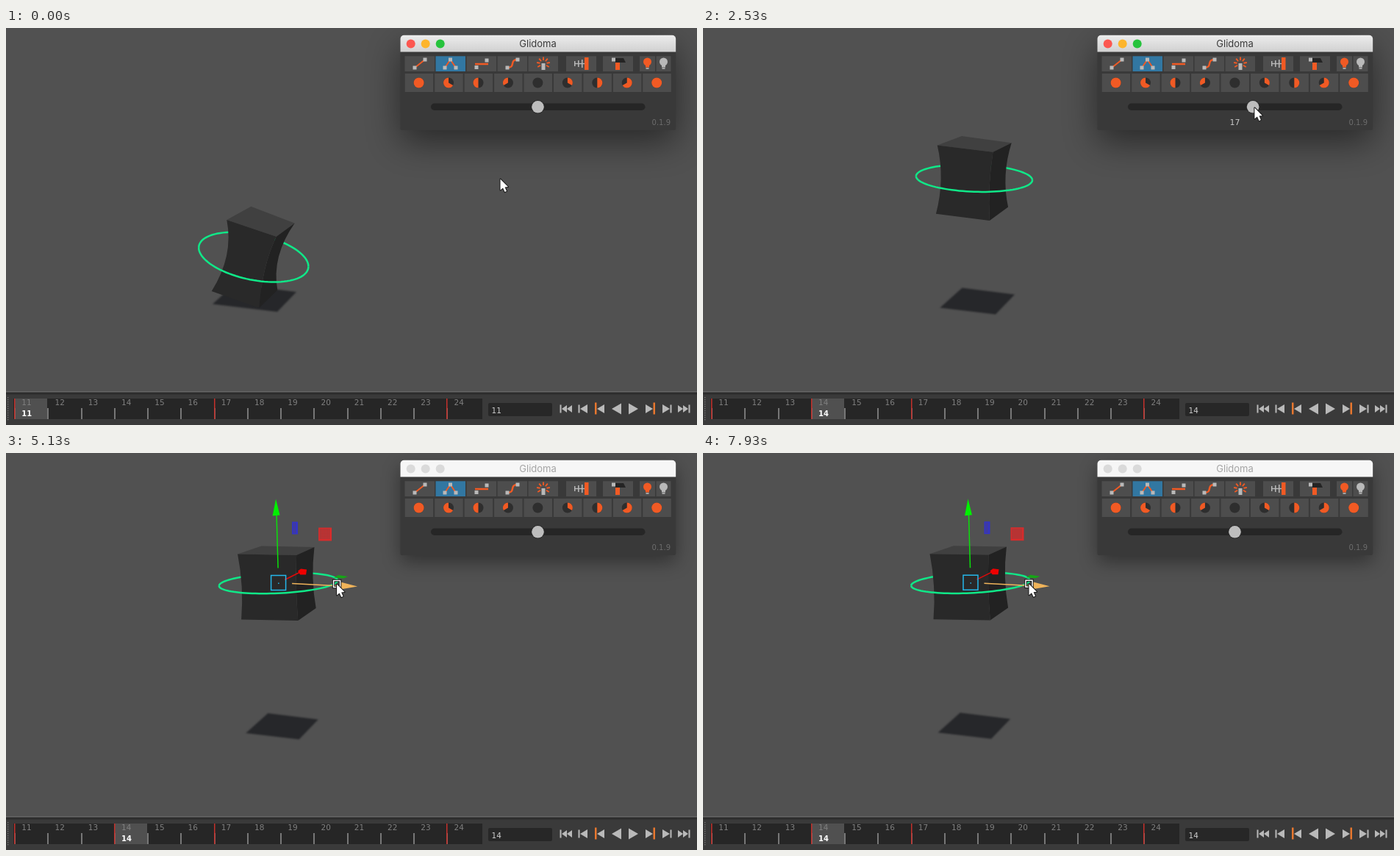
Recreate the animation shown at these times as an HTML page with a canvas. Size 940 px wide and 540 px high, loop 8 s.

```html
<!DOCTYPE html>
<html lang="en">
<head>
<meta charset="utf-8">
<title>Breakdown slider</title>
<style>
  html, body { margin: 0; width: 100%; height: 100%; overflow: hidden; background: #515151; }
  canvas { display: block; width: 940px; height: 540px; }
</style>
</head>
<body>
<canvas id="stage" width="940" height="540"></canvas>
<script>
const ctx = document.getElementById('stage').getContext('2d');
const LOOP = 8000, STEP = 1000 / 15, TAU = Math.PI * 2;
const ORANGE = '#f15a24', GREY = '#b9b9b9';
const UI = '"DejaVu Sans", sans-serif';

// A pose is a centre, three half-axes (width, depth, height) and how far the waist is pinched.
const CROUCH = { c: [337.5, 310.3], x: [31, 11.4], z: [14.5, -10.6], y: [11, -47], pinch: .22 };
const MID = { c: [365, 213.8], x: [34.3, 6.2], z: [14.8, -8], y: [3, -46], pinch: .14 };
const SLID = { c: [381, 176.2], x: [37.3, .7], z: [14.2, -7], y: [-1.8, -43], pinch: .06 };
const SHIFT = [-16.5, -.8];

const VALUE = [[1867, 0], [2533, 17], [3267, 46], [3667, 59]];
const DRAG = [[4867, 0], [5200, .75], [5533, 1]];
const PRESS = 1867, RELEASE = 3867, TOOL = 4267, GRAB = 4867;

const lerp = (a, b, k) => a + (b - a) * k;
const clamp = k => Math.min(1, Math.max(0, k));
const smooth = k => k * k * (3 - 2 * k);
const lerp2 = (p, q, k) => p.map((n, i) => lerp(n, q[i], k));
const glide = (p, q, t, from, to) => lerp2(p, q, smooth(clamp((t - from) / (to - from))));

function blend(p, q, k) {
  const out = { pinch: lerp(p.pinch, q.pinch, k) };
  for (const key of ['c', 'x', 'z', 'y']) out[key] = lerp2(p[key], q[key], k);
  return out;
}
function track(keys, t) {
  const i = keys.findIndex(key => t < key[0]);
  if (i === 0) return keys[0][1];
  if (i < 0) return keys[keys.length - 1][1];
  const [[t0, a], [t1, b]] = [keys[i - 1], keys[i]];
  return lerp(a, b, (t - t0) / (t1 - t0));
}

function rect(x, y, w, h, fill) {
  ctx.fillStyle = fill;
  ctx.fillRect(x, y, w, h);
}
function round(x, y, w, h, r, fill) {
  ctx.beginPath();
  ctx.roundRect(x, y, w, h, r);
  ctx.fillStyle = fill;
  ctx.fill();
}
function disc(x, y, r, fill) {
  ctx.beginPath();
  ctx.arc(x, y, r, 0, TAU);
  ctx.fillStyle = fill;
  ctx.fill();
}
function trace(pts) {
  ctx.beginPath();
  for (let i = 0; i < pts.length; i += 2) ctx.lineTo(pts[i], pts[i + 1]);
}
function poly(pts, fill) {
  trace(pts);
  ctx.closePath();
  ctx.fillStyle = fill;
  ctx.fill();
}
function line(pts, color, width) {
  trace(pts);
  ctx.strokeStyle = color;
  ctx.lineWidth = width;
  ctx.stroke();
}
function text(s, x, y, font, color, align = 'left') {
  ctx.font = font;
  ctx.textAlign = align;
  ctx.fillStyle = color;
  ctx.fillText(s, x, y);
}

// Circle around the waist, in the plane of the width and depth axes.
function drawRing({ c, x, z, pinch }, from) {
  const r = 1.96 + pinch, span = Math.hypot(x[0], z[0]);
  const skew = r * (x[0] * x[1] + z[0] * z[1]) / span;
  const ry = r * Math.abs(x[0] * z[1] - x[1] * z[0]) / span;
  const pts = [];
  for (let i = 0; i <= 48; i++) {
    const a = from + Math.PI * i / 48;
    pts.push(c[0] - .7 + r * span * Math.cos(a), c[1] + 1.3 + skew * Math.cos(a) + ry * Math.sin(a));
  }
  line(pts, '#10e888', 2.5);
}

function drawShadow([cx, cy]) {
  const x = cx + 10.5 - .029 * cy, y = 371 + .12 * (x - 370), w = 35.2 + .058 * (cy - 176);
  const corner = (a, b) => [x + a * w + 14 * b - a * b, y + .12 * a * w - 13.5 * b];
  ctx.filter = 'blur(1px)';
  poly([corner(-1, -1), corner(-1, 1), corner(1, 1), corner(1, -1)].flat(), '#26272a');
  ctx.filter = 'none';
}

function drawBody(pose) {
  const { c, x, z, y, pinch } = pose;
  // The mixed terms stand in for perspective.
  const corner = (a, b, h) => [
    c[0] + a * x[0] + b * z[0] + h * y[0] - 2 * a * b + .7 * a * h,
    c[1] + a * x[1] + b * z[1] + h * y[1] + 1.5 * b * h];
  const edge = (a, b, from) => {
    const p = corner(a, b, from), q = corner(a, b, -from);
    const pull = i => (p[i] + q[i]) / 2 - 2 * pinch * (a * x[i] + b * z[i]);
    ctx.lineTo(...p);
    ctx.quadraticCurveTo(pull(0), pull(1), ...q);
  };
  const side = (a, b, a2, b2, fill) => {
    ctx.beginPath();
    edge(a, b, 1);
    edge(a2, b2, -1);
    ctx.closePath();
    ctx.fillStyle = fill;
    ctx.fill();
  };
  drawShadow(c);
  drawRing(pose, Math.PI);
  poly([corner(-1, -1, 1), corner(1, -1, 1), corner(1, 1, 1), corner(-1, 1, 1)].flat(), '#404040');
  side(1, -1, 1, 1, '#222222');
  side(-1, -1, 1, -1, '#292929');
  drawRing(pose, 0);
}

function drawManipulator([cx, cy], held) {
  ctx.save();
  ctx.translate(cx - 1, cy + .8);
  line([0, -20, -2, -92], '#0be00b', 1.5);
  poly([-3, -114, 2.5, -92, -7.5, -91], '#00f000');
  for (const [x, y, w, h, color] of [[19, -83, 8, 17, '#3434c4'], [55, -75, 18, 18, '#d62c2c']]) {
    rect(x, y, w, h, color);
    ctx.setLineDash([1, 1]);
    for (let d = 2.5; d < h - 2; d += 2) line([x + 2, y + d, x + w - 2, y + d], '#5a4a4a', 1);
    ctx.setLineDash([]);
  }
  poly([76, -7, 82, -10.5, 95, -8.5, 89, -6], '#16a516');
  line([9, -4, 29, -14], '#e00a0a', 1.5);
  poly([27, -16, 31, -19, 39, -18, 38, -11, 30, -11], '#ee0000');
  const hot = held ? '#f0b45a' : '#f5f500';
  line([19, 1, 86, 4.5], hot, 1.6);
  poly([85, -1, 108, 5, 85, 9], hot);
  ctx.strokeStyle = '#25b7ea';
  ctx.lineWidth = 1.5;
  ctx.strokeRect(-9.5, -10, 20, 20);
  rect(0, 0, 1.5, 1.5, '#25b7ea');
  ctx.restore();
}

function drawToolIcons() {
  const nodes = (...pts) => pts.forEach(([x, y]) => rect(x - 2.5, y - 2.5, 5, 5, GREY));
  const linked = (...pts) => {
    line(pts.flat(), ORANGE, 2);
    nodes(...pts);
  };
  linked([556, 54], [570, 43]);
  linked([597, 54], [604.5, 43], [612, 54]);
  line([638, 49, 656, 49], ORANGE, 2.5);
  nodes([640, 53.5], [654, 44]);
  ctx.beginPath();
  ctx.moveTo(682, 54);
  ctx.bezierCurveTo(694, 54, 684, 43, 696, 43);
  ctx.stroke();
  nodes([682, 54], [696, 43]);

  for (let i = 0; i < 7; i++) {
    const a = Math.PI * (.83 + i * 1.34 / 6), c = Math.cos(a), s = Math.sin(a);
    line([731 + 4.5 * c, 48.5 + 4.5 * s, 731 + 9 * c, 48.5 + 9 * s], ORANGE, 1.8);
  }
  rect(728.5, 48, 5, 9, GREY);

  line([773, 48.5, 787, 48.5], GREY, 1.3);
  for (let i = 0; i < 3; i++) rect(773 + 5 * i, 45 - i, 1.5, 7 + 2 * i, GREY);
  rect(787, 40, 5.5, 17, ORANGE);

  poly([827, 41, 840, 41, 843, 47, 829, 47], '#242424');
  nodes([826.5, 43]);
  rect(829, 47, 6, 10, ORANGE);

  for (const [x, color] of [[872.5, ORANGE], [894.5, GREY]]) {
    disc(x, 46, 5.5, color);
    rect(x - 2.5, 50, 5, 3.5, color);
    rect(x - 2, 54.2, 4, 1.6, GREY);
  }
}

function drawPies() {
  for (let i = 0; i < 9; i++) {
    const x = 542.7 + 40.45 * i, cx = x + 18.9, left = i < 4;
    const n = Math.abs(4 - i), part = n === 4 ? 1 : (n + 1) / 6 * (n > 0);
    rect(x, 62, 38.5, 25, '#4d4d4d');
    disc(cx, 74.5, 7, '#2e2e2e');
    if (!part) continue;
    ctx.beginPath();
    if (part < 1) ctx.moveTo(cx, 74.5);
    ctx.arc(cx, 74.5, 7, -TAU / 4, TAU * (part * (left ? -1 : 1) - .25), left);
    ctx.fillStyle = ORANGE;
    ctx.fill();
  }
}

const knobX = value => 723.5 + Math.min(2.3 + 1.31 * value, 3 * value);

function drawWindow(active, dragging, value) {
  ctx.save();
  ctx.shadowColor = active ? 'rgba(0,0,0,.5)' : 'rgba(0,0,0,.4)';
  ctx.shadowBlur = active ? 48 : 26;
  ctx.shadowOffsetY = active ? 16 : 9;
  round(536.5, 9.7, 374.7, 129.3, [5, 5, 2, 2], '#393939');
  ctx.restore();
  const bar = ctx.createLinearGradient(0, 10, 0, 33);
  bar.addColorStop(0, active ? '#ececec' : '#f6f6f6');
  bar.addColorStop(1, active ? '#d0d0d0' : '#f6f6f6');
  round(536.5, 9.7, 374.7, 22.8, [5, 5, 0, 0], bar);
  ['#fc5750', '#fdb52c', '#26c33c'].forEach((c, i) => disc(550.7 + 20 * i, 21.5, 6, active ? c : '#dadada'));
  text('Glidoma', 723.5, 26, '13px Inter, sans-serif', active ? '#3b3b3b' : '#a5a5a5', 'center');

  for (let i = 0; i < 5; i++) rect(542.5 + 42 * i, 38.3, 40.5, 20.7, i === 1 ? '#3277a2' : '#4d4d4d');
  for (const [x, w] of [[762, 41], [812, 41], [862, 21], [884.5, 20]]) rect(x, 38.3, w, 20.7, '#4d4d4d');
  drawToolIcons();
  drawPies();

  round(578, 102.5, 291.5, 9.5, 4.7, '#262626');
  const knob = knobX(dragging ? value : 0);
  disc(knob, 107.3, 9.2, '#292929');
  disc(knob, 107.3, 8.3, '#bdbdbd');
  if (dragging) text(Math.round(value), 723.5, 132, '11px ' + UI, '#c8c8c8', 'center');
  text('0.1.9', 904, 132, '10px ' + UI, '#6c6c6c', 'right');
}

// Left-facing half of the buttons; the right half is its mirror image.
function drawTransport() {
  const tri = (x, w, h = 6) => poly([x, 518, x + w, 518 - h, x + w, 518 + h], GREY);
  const bar = x => rect(x, 512.5, 2, 11, GREY);
  for (const flip of [1, -1]) {
    ctx.save();
    ctx.translate(842, 0);
    ctx.scale(flip, 1);
    bar(-88.5); tri(-86, 7, 5); tri(-79, 7, 5);
    bar(-63.5); tri(-61, 10);
    rect(-41, 509.5, 2.5, 16, '#e8772e'); tri(-38, 10);
    tri(-18, 13, 7.5);
    ctx.restore();
  }
}

function drawTimeline(frame, keyed) {
  rect(0, 494, 940, 46, '#3a3a3a');
  rect(0, 494, 940, 1.3, '#666666');
  rect(0, 496, 940, 2.5, '#2c2c2c');
  for (let y = 502; y < 534; y += 3) rect(2, y, 1.3, 1.3, '#777777');
  rect(10, 504, 638, 28, '#262626');
  const tick = f => 12 + 45.25 * (f - 11);
  rect(Math.round(tick(frame)), 504, 44, 28, '#505050');
  for (let f = 11; f <= 24; f++) {
    const x = Math.round(tick(f));
    rect(x - 1, 517, 2, 15, '#777777');
    if ([11, 17, 24].includes(f) || (keyed && f === 14)) rect(x - 1, 504, 1.5, 28, '#c4302b');
    text(f, tick(f) + 9.3, 513, '10.5px ' + UI, '#7f7f7f');
  }
  text(frame, tick(frame) + 9.2, 528, 'bold 10px ' + UI, '#ffffff');
  round(656, 510, 87, 18, 2, '#272727');
  text(frame, 660.5, 523.5, '10.5px ' + UI, '#cccccc');
  drawTransport();
}

function drawPointer([x, y], tool) {
  ctx.save();
  ctx.translate(x, y);
  if (tool) {
    for (const [color, width] of [['#111111', 3.4], ['#ffffff', 1.5]]) {
      ctx.strokeStyle = color;
      ctx.lineWidth = width;
      ctx.strokeRect(-4, -4, 9, 9);
    }
  }
  trace([.5, 1, .5, 16, 4, 13, 6.6, 18.6, 9, 17.4, 6.6, 12, 11, 11.6]);
  ctx.closePath();
  ctx.lineJoin = 'round';
  ctx.lineWidth = 2;
  ctx.strokeStyle = '#161616';
  ctx.stroke();
  ctx.fillStyle = '#ffffff';
  ctx.fill();
  ctx.restore();
}

function pointerAt(t, value, drag) {
  const onKnob = [knobX(value) + 1.8, 106 + .09 * value];
  if (t < PRESS) return glide([672, 204.5], onKnob, t, 1000, 1667);
  if (t < RELEASE) return onKnob;
  if (t < 4467) return glide(onKnob, [526, 158], t, RELEASE, 4467);
  const [x, y] = glide([526, 158], [459.5, 178], t, 4467, 4800);
  return [x + SHIFT[0] * drag, y + SHIFT[1] * drag];
}

function draw(t) {
  const frame = 11 + Math.floor(3 * clamp((t - 90) / 510));
  const value = track(VALUE, t), drag = track(DRAG, t);
  const dragging = t >= PRESS && t < RELEASE;
  const pose = t < PRESS
    ? blend(CROUCH, MID, 2 * smooth((frame - 11) / 6))
    : blend(MID, SLID, value / 59);
  pose.c = pose.c.map((n, i) => n + SHIFT[i] * drag);

  rect(0, 0, 940, 540, '#515151');
  drawBody(pose);
  if (t >= TOOL) drawManipulator(pose.c, t >= GRAB);
  drawTimeline(frame, t >= PRESS);
  drawWindow(t < GRAB, dragging, value);
  drawPointer(pointerAt(t, value, drag), t >= TOOL);
}

const start = performance.now();
function tick() {
  const t = (performance.now() - start) % LOOP;
  draw(Math.floor((t + 5) / STEP) * STEP + .5);
  requestAnimationFrame(tick);
}
tick();
</script>
</body>
</html>
```
